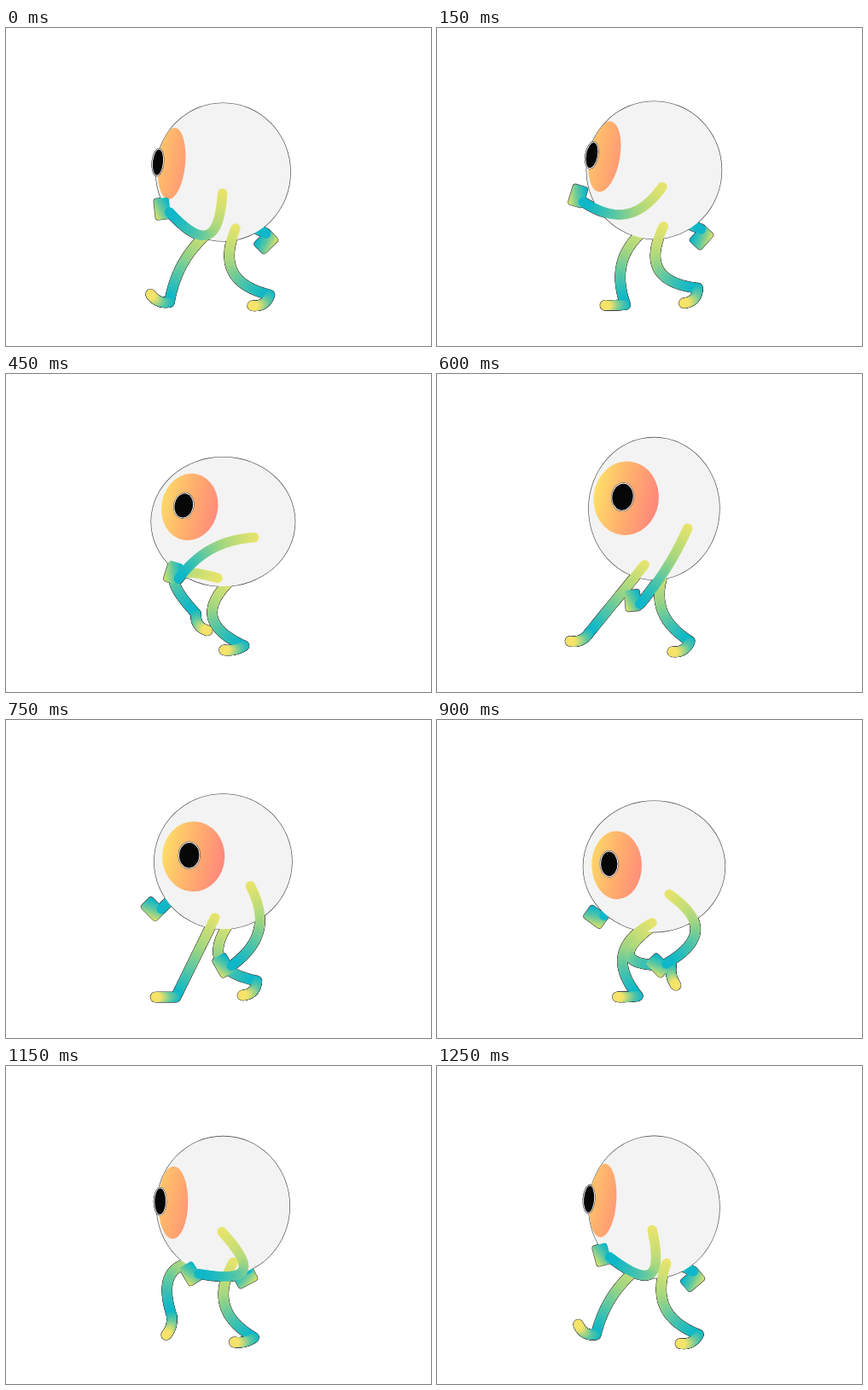
Animation, 498 px wide and 373 px high, one loop 1300 ms. Source, as an HTML page with a canvas:

```html
<!DOCTYPE html>
<html lang="en">
<head>
<meta charset="utf-8">
<title>Running eyeball</title>
<style>
  html, body { margin: 0; width: 100%; height: 100%; overflow: hidden; background: #fff; }
  canvas { display: block; }
</style>
</head>
<body>
<canvas id="stage" width="498" height="373"></canvas>
<script>
const ctx = document.getElementById('stage').getContext('2d');
const { sin, cos, sqrt, hypot, PI } = Math;
const LOOP = 1300, STEP = 50, LIMB = 11.4, RIM = 0.6;
const CX = 254.4, AREA = 6390;
const INK = '#3c3c3c';
const YELLOW = [236, 229, 106], LIME = [160, 214, 130], TEAL = [15, 183, 200];
const MINT = [96, 200, 160], TOE = [245, 227, 106];

// Bounce: time, centre y, half height. The width follows from a constant area.
const BOUNCE = [
  [0, 169, 81], [250, 165.5, 80.5], [450, 173.3, 75.8], [575, 157.5, 83.6],
  [750, 166, 79.2], [1050, 175, 75.8], [1200, 160.5, 84], [1250, 165.5, 83.3]
];
// Stride shared by both legs: time, ankle x, ankle y, toe direction in degrees.
const STRIDE = [
  [0, 309, 313, 148], [140, 306, 306, 135], [250, 293, 291, 86], [440, 226, 281, 55],
  [600, 178, 304, 157], [650, 180, 317, 215], [750, 199, 325, 180], [1050, 270, 321, 175]
];

const rad = deg => deg * PI / 180;
const turn = t => 2 * PI * t / LOOP;

// Smooth periodic interpolation that never overshoots a key.
function pose(keys, time) {
  const t = time % LOOP, n = keys.length;
  const key = i => keys[(i + n) % n];
  const at = i => key(i)[0] + LOOP * Math.floor(i / n);
  let i = n - 1;
  while (keys[i][0] > t) i--;
  const h = at(i + 1) - at(i), u = (t - at(i)) / h;
  const slope = (j, k) => (key(j + 1)[k] - key(j)[k]) / (at(j + 1) - at(j));
  const tangent = (j, k) => {
    const a = slope(j - 1, k), b = slope(j, k);
    return a * b > 0 ? 2 * a * b / (a + b) : 0;
  };
  return key(i).slice(1).map((a, m) => {
    const k = m + 1, d = key(i + 1)[k] - a;
    return a + d * u * u * (3 - 2 * u)
      + h * u * (1 - u) * ((1 - u) * tangent(i, k) - u * tangent(i + 1, k));
  });
}

const mix = (a, b, u) => a.map((v, i) => v + (b[i] - v) * u);
const rgb = c => `rgb(${c.map(Math.round).join()})`;
const ramp = (a, b, c) => u => u < 0.45 ? mix(a, b, u / 0.45) : mix(b, c, (u - 0.45) / 0.55);
const limbTint = ramp(YELLOW, LIME, TEAL);
const toeTint = ramp(TEAL, MINT, TOE);

// Rounded tube from a to b; bow pushes the handles sideways, spread moves them along.
function tube(ax, ay, bx, by, bow, spread, tint, edge) {
  const dx = bx - ax, dy = by - ay, d = hypot(dx, dy);
  const kx = (ax + bx) / 2 + dy / d * bow, ky = (ay + by) / 2 - dx / d * bow;
  const bez = (p, k, q, s, u) => {
    const v = 1 - u;
    return v * v * v * p + 3 * v * v * u * (k - s) + 3 * v * u * u * (k + s) + u * u * u * q;
  };
  const points = Array.from({ length: 33 }, (_, i) =>
    [bez(ax, kx, bx, dx * spread, i / 32), bez(ay, ky, by, dy * spread, i / 32)]);
  ctx.lineCap = ctx.lineJoin = 'round';
  ctx.lineWidth = LIMB + (edge ? 2 * RIM : 0);
  for (let i = 1; i < points.length; i++) {
    ctx.strokeStyle = edge ? INK : rgb(tint(i / 32));
    ctx.beginPath();
    ctx.moveTo(...points[i - 1]);
    ctx.lineTo(...points[i]);
    ctx.stroke();
  }
}

// A limb of constant reach bows out more the closer its ends come.
const slack = (reach, d) => 0.64 * sqrt(Math.max(0, reach * reach - d * d));

function leg(time, y, narrow, edge) {
  const [x, ay, deg] = pose(STRIDE, time);
  const ax = 225 + (x - 225) * narrow;
  const hx = 256 + 13 * cos(turn(time) + 0.05), hy = y + 66;
  tube(hx, hy, ax, ay, -slack(103, hypot(ax - hx, ay - hy)), 0.16, limbTint, edge);
  const a = rad(deg), bend = Math.sign(deg - 90) * 7 * Math.abs(sin(2 * a));
  tube(ax, ay, ax + 24 * cos(a), ay + 24 * sin(a), bend, 0.16, toeTint, edge);
}

// Fist held at an offset from the wrist.
function fist(wx, wy, deg, ox, oy, edge) {
  const g = edge ? RIM : 0;
  ctx.save();
  ctx.translate(wx, wy);
  ctx.rotate(rad(deg));
  ctx.translate(ox, oy);
  const fill = ctx.createLinearGradient(-10, 4, 9, -4);
  fill.addColorStop(0, '#cfe070');
  fill.addColorStop(0.5, rgb(MINT));
  fill.addColorStop(1, rgb(TEAL));
  ctx.fillStyle = edge ? INK : fill;
  ctx.beginPath();
  ctx.roundRect(-9 - g, -12.5 - g, 18 + 2 * g, 25 + 2 * g, 3.5 + g);
  ctx.fill();
  ctx.restore();
}

function nearArm(t, y, edge) {
  const a = turn(t), swing = turn(t - 200);
  const sx = 273 - 21 * cos(a + 0.4), sy = y + 25 - 8 * sin(a);
  const wx = 220 - 50 * cos(swing), wy = 247 - 43 * cos(swing + 0.2);
  const whip = 37 * Math.max(0, cos(swing - 1.2)) ** 8;
  fist(wx, wy, 36 * cos(swing - 0.5) - 10, -8, -5, edge);
  tube(sx, sy, wx, wy, slack(106, hypot(wx - sx, wy - sy)) - whip, 0.15, limbTint, edge);
}

function farArm(t, edge) {
  const swing = turn(t - 200), s = swing + 0.25;
  const back = cos(s - 0.5 * sin(s));
  const x = 239 + 71 * back, y = 235 - 16 * sin(swing - 0.5);
  const deg = -90 - 48 * back, a = rad(deg);
  const wx = x + 7 * (cos(a) - sin(a)), wy = y + 7 * (sin(a) + cos(a));
  fist(wx, wy, deg, -7, -7, edge);
  tube(245, 210, wx, wy, 9 * (back - 1), 0.16, limbTint, edge);
}

function oval(x, y, rx, ry, tilt, fill) {
  ctx.beginPath();
  ctx.ellipse(x, y, rx, ry, tilt, 0, 2 * PI);
  ctx.fillStyle = fill;
  ctx.fill();
}

function eyeball(t, y, ry, edge) {
  const a = turn(t), rx = AREA / ry;
  const gaze = (0.5 - 0.5 * cos(a + 0.04)) ** 1.25;
  const tilt = rad(5.5 + 7 * sin(a));
  const ix = 194 + 28 * gaze, iy = y - 10 - 9 * sin(a);
  const pupil = (grow, fill) =>
    oval(178 + 40 * gaze, iy - 1.5, 6 + 6.2 * gaze + grow, ry * 0.187 + grow, tilt, fill);
  if (edge) {
    oval(CX, y, rx + RIM, ry + RIM, 0, INK);
    pupil(1.5, INK);
    return;
  }
  oval(CX, y, rx, ry, 0, '#f3f3f3');
  ctx.save();
  ctx.clip();
  const fill = ctx.createLinearGradient(ix - 38, iy - 8, ix + 38, iy + 8);
  fill.addColorStop(0, '#fde068');
  fill.addColorStop(0.5, '#ffae6e');
  fill.addColorStop(1, '#ff857c');
  oval(ix, iy, 16 + 22.5 * gaze, ry * 0.52, tilt, fill);
  ctx.restore();
  pupil(1.4, INK);
  pupil(0.9, '#fff');
  pupil(0, '#080708');
}

function draw(t) {
  const [y, ry] = pose(BOUNCE, t);
  ctx.fillStyle = '#fff';
  ctx.fillRect(0, 0, 498, 373);
  // First pass lays down the rim around the whole figure.
  for (const edge of [true, false]) {
    farArm(t, edge);
    leg(t + LOOP / 2 + 40, y, 0.85, edge);
    eyeball(t, y, ry, edge);
    leg(t, y, 1, edge);
    nearArm(t, y, edge);
  }
}

const start = performance.now();
function tick() {
  const t = (performance.now() - start) % LOOP;
  draw(Math.floor(t / STEP) * STEP);
  requestAnimationFrame(tick);
}
tick();
</script>
</body>
</html>
```
